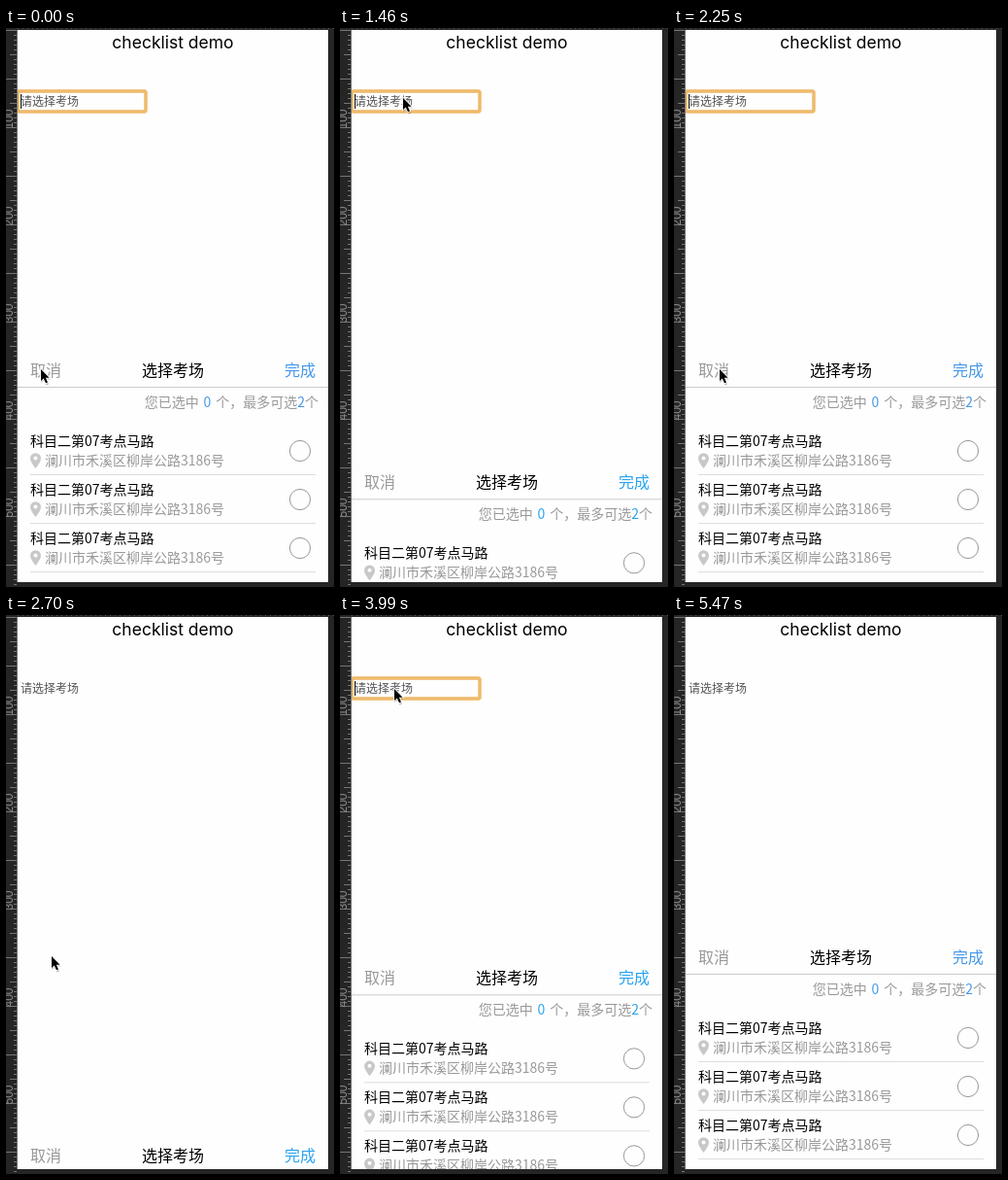
These frames come from a looping animation (338x575 px, 5.5 s). An HTML page:

```html
<!DOCTYPE html>
<html lang="zh-CN">
<head>
<meta charset="utf-8">
<title>checklist demo</title>
<style>
  html, body { margin: 0; width: 100%; height: 100%; overflow: hidden; background: #252525; }
  svg { display: block; width: 338px; height: 575px; }
  text { font: 14px "Noto Sans CJK SC", "Noto Sans CJK", "Noto Sans", sans-serif; white-space: pre; }
  .title { font: 17.5px Inter, sans-serif; }
  .bar { font-size: 16px; }
  .hint { font-size: 12px; fill: #555; }
  .muted { fill: #999; font-weight: 500; }
  .blue { fill: #4598e8; font-weight: 500; }
  .moving .blue { fill: #2aa3f0; }
  .count { word-spacing: 1.7px; }
  .ruler text { font: 12px "Liberation Sans", Arial, sans-serif; fill: #8a8a8a; }
</style>
</head>
<body>
<svg viewBox="0 0 338 575">
  <defs>
    <clipPath id="page"><rect x="12" y="2" width="320" height="568"/></clipPath>
    <filter id="soft" x="-10%" y="-40%" width="120%" height="180%"><feGaussianBlur stdDeviation="0.7"/></filter>
  </defs>
  <rect width="338" height="575" fill="#252525"/>
  <g class="ruler" id="ruler"></g>
  <rect x="12" y="2" width="320" height="568" fill="#fefefe"/>
  <text class="title" x="172" y="21" text-anchor="middle">checklist demo</text>
  <g clip-path="url(#page)">
    <g id="focus" fill="none" stroke="#efba6c">
      <rect x="12" y="65" width="132" height="21" rx="2" stroke-width="4" opacity=".6" filter="url(#soft)"/>
      <rect x="12.5" y="65" width="131.5" height="21" rx="1.5" stroke-width="2.8"/>
    </g>
    <text class="hint" x="15" y="80">请选择考场</text>
    <rect id="caret" x="15" y="68" width="1" height="15"/>
    <g id="panel">
      <rect x="12" y="335" width="320" height="235" fill="#fefefe"/>
      <text class="bar muted" x="25" y="358">取消</text>
      <text class="bar" x="172" y="358" text-anchor="middle">选择考场</text>
      <text class="bar blue" x="319" y="358" text-anchor="end">完成</text>
      <path d="M12 369.5H332" stroke="#ccc"/>
      <text class="muted count" x="322" y="390" text-anchor="end">您已选中 <tspan class="blue">0</tspan> 个，最多可选<tspan class="blue">2</tspan>个</text>
      <g id="rows"></g>
    </g>
  </g>
  <g id="cursor">
    <path d="M1 2V15L4 12.5L6.5 17.5L9 16.5L7 11.5H11Z" fill="#000" opacity=".25" filter="url(#soft)"/>
    <path d="M1 1V13L3.8 10.4L6 15.3L8 14.4L5.9 9.7H9.6Z" stroke="#fff" stroke-width="1.6" paint-order="stroke"/>
  </g>
</svg>
<script>
const LOOP = 5500, SLIDE = 500, DROP = 235, BLINK = 448, BLUR_AT = 5470, LEAVE_AT = 4920;
const $ = id => document.getElementById(id);

// Clicks on the input open the panel, clicks on cancel close it
const clicks = [
  { at: -SLIDE * 2, open: true, lag: 0 },
  { at: 150, open: false, lag: 23 },
  { at: 1350, open: true, lag: -38 },
  { at: 2390, open: false, lag: 23 },
  { at: 3710, open: true, lag: -38 }
];

// Pointer strokes, each a curve bent towards "via"
const cancel = [35, 350], input = [64, 71], cancelAgain = [46, 350], inputAgain = [55, 75];
const strokes = [
  { start: 500, end: 1060, from: cancel, via: [170, 170], to: input },
  { start: 1900, end: 2250, from: input, via: [55, 210], to: cancelAgain },
  { start: 2800, end: 3500, from: cancelAgain, via: [80, 150], to: inputAgain },
  { start: 4250, end: LEAVE_AT, from: inputAgain, via: [181, 464], to: [306, 580] }
];

function drawRuler() {
  let ticks = "", labels = "";
  for (let n = 0; n <= 570; n += 5) {
    const len = n % 50 === 0 ? 11 : n % 25 === 0 ? 7 : 3;
    ticks += `M${11 - len} ${n + 2.5}H11`;
    if (n && n % 100 === 0) labels += `<text transform="translate(7 ${n + 3.5}) rotate(-90)">${n}</text>`;
  }
  $("ruler").innerHTML = `<path d="${ticks}M11.5 2V570" stroke="#757575"/>
    <path d="M12 .5H338" stroke="#555" stroke-dasharray="1 4"/>${labels}`;
}

function drawRows() {
  $("rows").innerHTML = [0, 1, 2].map(i => `<g transform="translate(0 ${i * 50})">
    <text x="25" y="430">科目二第07考点马路</text>
    <path d="M30.5 453C28 449.5 25 446 25 442.7A5.5 5.5 0 0 1 36 442.7C36 446 33 449.5 30.5 453Z" fill="#c8c8c8"/>
    <circle cx="30.5" cy="442.5" r="2" fill="#fff"/>
    <text class="muted" x="40" y="450">澜川市禾溪区柳岸公路3186号</text>
    <circle cx="303" cy="435" r="10.6" fill="none" stroke="#999"/>
    <path d="M25 459.5H319" stroke="#ddd"/>
  </g>`).join("");
}

const clamp = x => Math.min(1, Math.max(0, x));
const smooth = x => x * x * (3 - 2 * x);
const show = (id, on) => $(id).setAttribute("visibility", on ? "visible" : "hidden");

// The CSS "ease" curve, solved by bisection
function ease(x) {
  const curve = (a, b, s) => 3 * a * s * (1 - s) ** 2 + 3 * b * s * s * (1 - s) + s ** 3;
  let lo = 0, hi = 1;
  for (let i = 0; i < 24; i++) {
    const mid = (lo + hi) / 2;
    if (curve(0.25, 0.25, mid) < x) lo = mid; else hi = mid;
  }
  return curve(0.1, 1, lo);
}

function placePanel(t, click) {
  const k = clamp((t - click.at - click.lag) / SLIDE);
  const closed = click.open ? 1 - ease(k) : ease(k);
  $("panel").setAttribute("transform", `translate(0 ${(closed * DROP).toFixed(2)})`);
  $("panel").classList.toggle("moving", k < 1);
}

function placeFocus(t, click) {
  const focused = click.open && t < BLUR_AT;
  const age = t - Math.max(0, click.at);
  show("focus", focused);
  show("caret", focused && Math.floor(age / BLINK) % 2 === 0);
}

function placeCursor(t) {
  const { start, end, from, via, to } = strokes.filter(s => t >= s.start).pop() || strokes[0];
  const k = smooth(clamp((t - start) / (end - start)));
  const [x, y] = from.map((a, i) =>
    Math.round(a * (1 - k) ** 2 + 2 * via[i] * k * (1 - k) + to[i] * k * k));
  $("cursor").setAttribute("transform", `translate(${x} ${y})`);
  show("cursor", t < LEAVE_AT);
}

function render() {
  const t = performance.now() % LOOP;
  const click = clicks.filter(c => t >= c.at).pop();
  placePanel(t, click);
  placeFocus(t, click);
  placeCursor(t);
  requestAnimationFrame(render);
}

drawRuler();
drawRows();
render();
</script>
</body>
</html>
```
